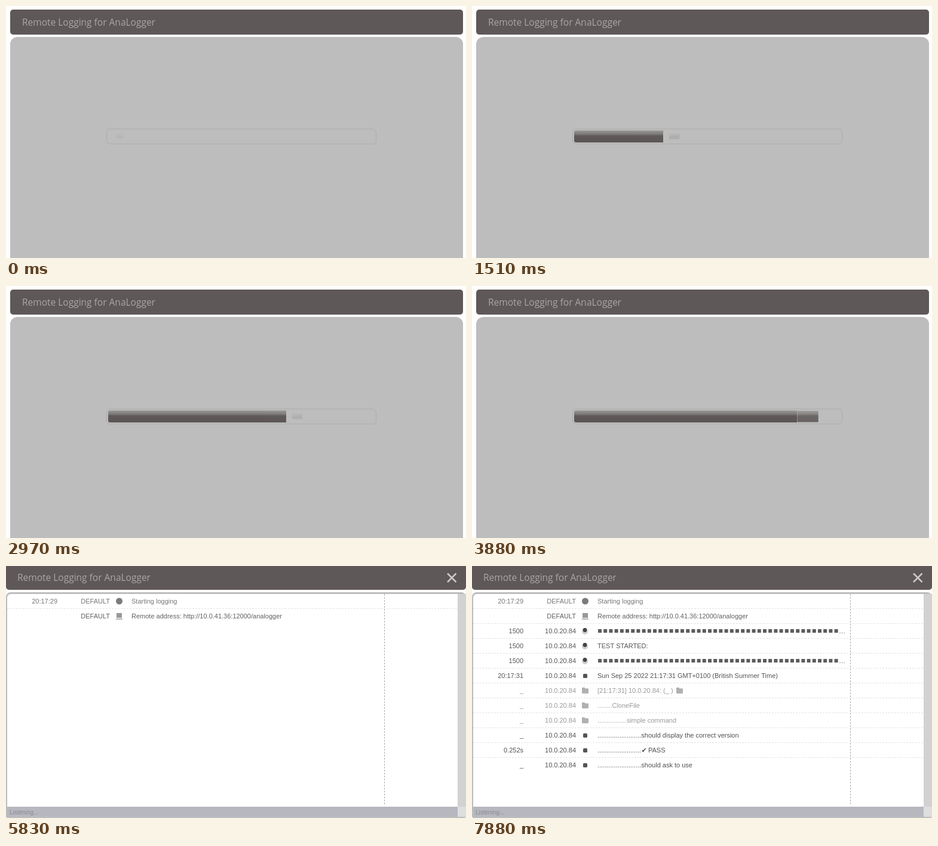
Animation, 770 px wide and 423 px high, one loop 8 s. Source, as an HTML page with a canvas:

```html
<!DOCTYPE html>
<html lang="en">
<head>
<meta charset="utf-8">
<title>Remote Logging for AnaLogger</title>
<style>
  html, body { margin: 0; width: 100%; height: 100%; overflow: hidden; background: #fff; }
  canvas { display: block; }
</style>
</head>
<body>
<canvas id="stage" width="770" height="423"></canvas>
<script>
const ctx = document.getElementById('stage').getContext('2d');
const LOOP = 8000, BAR_HIDDEN = 5760, LOG_SHOWN = 5830;
const BAR = { x: 171, y: 209, height: 20, segment: 37.25, count: 12, start: -125, duration: 366 };
const TAU = Math.PI * 2, GRAY = '#bdbdbd';

const dots = n => '.'.repeat(n);
const IP = '10.0.20.84';
const SQUARES = null;
// Each row: time shown, stamp, source, icon, message, text colour
const ROWS = [
  [0, '20:17:29', 'DEFAULT', 'circle', 'Starting logging', '#777'],
  [0, '', 'DEFAULT', 'screen', 'Remote address: http://10.0.41.36:12000/analogger', '#606060'],
  [7610, '1500', IP, 'lamp', SQUARES, '#555'],
  [7610, '1500', IP, 'lamp', 'TEST STARTED:', '#555'],
  [7610, '1500', IP, 'lamp', SQUARES, '#555'],
  [7610, '20:17:31', IP, 'square', 'Sun Sep 25 2022 21:17:31 GMT+0100 (British Summer Time)', '#555'],
  [7680, '_', IP, 'folder', '[21:17:31] 10.0.20.84: (_ )', '#999'],
  [7680, '_', IP, 'folder', dots(8) + 'CloneFile', '#999'],
  [7680, '_', IP, 'folder', dots(16) + 'simple command', '#999'],
  [7680, '_', IP, 'square', dots(24) + 'should display the correct version', '#505050'],
  [7880, '0.252s', IP, 'square', dots(24), '#505050'],
  [7880, '_', IP, 'square', dots(24) + 'should ask to use', '#505050']
];

function rect(x, y, w, h, color) {
  ctx.fillStyle = color;
  ctx.fillRect(x, y, w, h);
}

function rounded(x, y, w, h, radius, color) {
  ctx.fillStyle = color;
  ctx.beginPath();
  ctx.roundRect(x, y, w, h, radius);
  ctx.fill();
}

function disc(x, y, r, color) {
  ctx.fillStyle = color;
  ctx.beginPath();
  ctx.arc(x, y, r, 0, TAU);
  ctx.fill();
}

function line(x1, y1, x2, y2, color, width = 1, dash = []) {
  ctx.strokeStyle = color;
  ctx.lineWidth = width;
  ctx.setLineDash(dash);
  ctx.beginPath();
  ctx.moveTo(x1, y1);
  ctx.lineTo(x2, y2);
  ctx.stroke();
  ctx.setLineDash([]);
}

function text(string, x, y, color, align = 'left', font = '11px "Liberation Sans", Arial, sans-serif') {
  ctx.font = font;
  ctx.textAlign = align;
  ctx.fillStyle = color;
  ctx.fillText(string, x, y);
}

function title(x, y) {
  text('Remote Logging for AnaLogger', x, y, '#a9a7a7', 'left', '15.5px "Open Sans", "Noto Sans", sans-serif');
}

const icons = {
  circle: y => disc(189.5, y, 5.5, '#7b7b7b'),
  screen(y) {
    rect(185, y - 5, 9, 8, '#999');
    rect(184, y + 4, 11, 2, '#b5b5b5');
  },
  lamp(y) {
    disc(189, y + 1, 5, '#cfcfcf');
    disc(189, y - 1.5, 3.4, '#444');
  },
  square: y => rounded(186, y - 3, 7, 7, 1.5, '#555'),
  folder: (y, x = 184) => {
    rounded(x, y - 5, 5, 4, 1, '#b0b0b0');
    rounded(x, y - 3.5, 11, 8.5, 1, '#b0b0b0');
  }
};

// One bar piece, scaled about its own centre
function barPiece(left, right, scale, alpha) {
  const { y, height } = BAR;
  const shade = ctx.createLinearGradient(0, -height / 2, 0, height / 2);
  shade.addColorStop(0, '#989894');
  shade.addColorStop(0.3, '#7c7a78');
  shade.addColorStop(0.45, '#5f5959');
  shade.addColorStop(1, '#5a5454');
  ctx.save();
  ctx.globalAlpha = alpha;
  ctx.translate((left + right) / 2, y + height / 2);
  ctx.scale(scale, scale);
  rect((left - right) / 2, -height / 2, right - left, height, shade);
  ctx.restore();
}

function progress(t) {
  const { x, y, height, segment, count, start, duration } = BAR;
  ctx.strokeStyle = '#acacac';
  ctx.lineWidth = 1;
  ctx.beginPath();
  ctx.roundRect(168.5, 206.5, 451, 25, 5);
  ctx.stroke();

  const elapsed = (t - start) / duration;
  const done = Math.min(count, Math.floor(elapsed));
  const edge = i => Math.round(x + i * segment);
  ctx.save();
  ctx.beginPath();
  ctx.roundRect(x, y, segment * count, height, 3);
  ctx.clip();
  if (done > 1) barPiece(x, edge(done - 1), 1, 1);
  if (done > 0) barPiece(edge(done - 1), edge(done), 1, Math.min(1, 0.94 + (elapsed - done) * 0.1));
  if (done < count) {
    const growth = elapsed - done;
    barPiece(x + done * segment, x + (done + 1) * segment, growth, growth ** 2.6);
  }
  ctx.restore();
}

function loadingView(t) {
  rounded(7, 6, 758, 42, 5, '#5f5858');
  title(27, 33);
  rounded(7, 52, 758, 380, [12, 12, 0, 0], GRAY);
  if (t < BAR_HIDDEN) progress(t);
}

function logRow([, stamp, source, icon, message, color], i) {
  const y = 59 + i * 25, base = y + 4;
  text(stamp, 86, base, color, 'right');
  text(source, 174, base, color, 'right');
  icons[icon](y);
  if (message === SQUARES) {
    for (let n = 0; n < 44; n++) rect(211 + n * 9.2, y - 3, 6, 6, '#5c5c5c');
    text('…', 614, base, color);
  } else {
    text(message, 210, base, color);
  }
  if (icon === 'folder' && message.startsWith('[')) icons.folder(y, 342);
  if (stamp === '0.252s') {
    text('✔', 283.4, base, color, 'left', '11px "DejaVu Sans", sans-serif');
    text('PASS', 295, base, color);
  }
}

function logView(t) {
  rounded(0, -4, 770, 44, 5, '#5f5858');
  title(19, 25);
  line(739, 12.5, 753.5, 27, '#cbcaca', 2.5);
  line(753.5, 12.5, 739, 27, '#cbcaca', 2.5);

  rounded(0, 44, 770, 379, [8, 8, 3, 3], GRAY);
  rounded(2, 47, 754, 357, [6, 0, 0, 0], '#fff');
  rect(756, 47, 14, 357, '#d2d2d2');
  rect(756, 404, 14, 17, '#dedede');
  rect(2, 404, 754, 17, '#b7b7bf');
  text('Listening...', 6, 417, '#8b8b8b', 'left', '10px "Liberation Sans", Arial, sans-serif');

  const visible = ROWS.filter(row => row[0] <= t);
  visible.forEach((row, i) => {
    if (i) line(2, 46.5 + i * 25, 756, 46.5 + i * 25, '#e2e2e2', 1, [3, 2]);
    logRow(row, i);
  });
  line(633.5, 47, 633.5, 400, '#aaa', 1, [3, 2]);
}

function draw() {
  const t = performance.now() % LOOP;
  rect(0, 0, 770, 423, '#fff');
  (t < LOG_SHOWN ? loadingView : logView)(t);
  requestAnimationFrame(draw);
}
draw();
</script>
</body>
</html>
```
